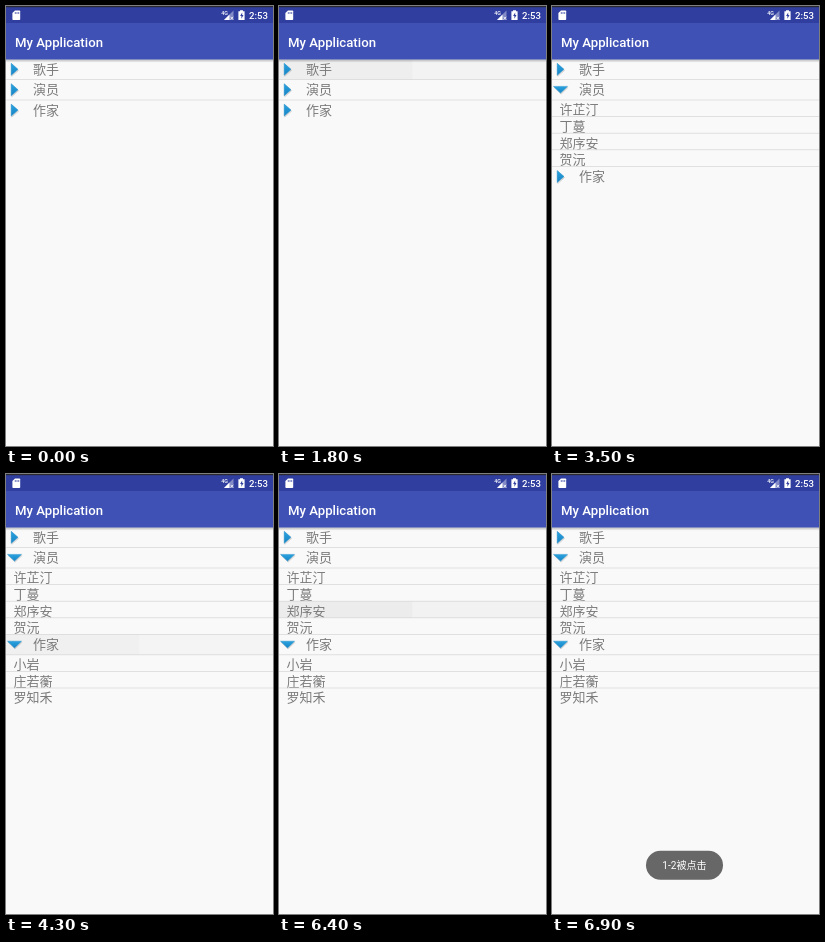
Recreate the animation shown at these times as an HTML page. Size 267x440 px, loop 8000 ms.

```html
<!DOCTYPE html>
<html lang="zh-CN">
<head>
<meta charset="utf-8">
<style>
html, body { margin: 0; width: 100%; height: 100%; overflow: hidden; background: #f9f9f9; }
svg { display: block; width: 100%; height: 100%; }
text { font-family: Roboto, "Noto Sans CJK SC", "Noto Sans CJK", sans-serif; white-space: pre; }
.row { font-size: 13px; fill: #7b7b7b; }
.bar { font-weight: 500; fill: #fff; }
</style>
</head>
<body>
<svg viewBox="0 0 267 440">
  <defs>
    <linearGradient id="shade" x2="0" y2="1">
      <stop stop-color="#000" stop-opacity=".26"/>
      <stop offset="1" stop-color="#000" stop-opacity="0"/>
    </linearGradient>
    <linearGradient id="blue" x2="0" y2="1">
      <stop stop-color="#2aa3e0"/>
      <stop offset="1" stop-color="#1683c4"/>
    </linearGradient>
  </defs>
  <rect width="267" height="440" fill="#f9f9f9"/>
  <g id="list"></g>

  <rect y="53.3" width="267" height="3.4" fill="url(#shade)"/>
  <rect y="17" width="267" height="36.5" fill="#3f51b5"/>
  <rect width="267" height="17" fill="#303f9f"/>
  <rect width="267" height="1.2" fill="#29292f"/>
  <text class="bar" x="9" y="41" font-size="13.2">My Application</text>

  <path d="M9 4.5H13.4Q14.2 4.5 14.2 5.3V13.2Q14.2 14 13.4 14H7.2Q6.4 14 6.4 13.2V7.1Z" fill="#fff"/>
  <path d="M9.3 6v2M11 6v2M12.7 6v2" stroke="#303f9f" stroke-width=".7"/>
  <path d="M227.5 4.5V14H218Z" fill="#fff" opacity=".4"/>
  <path d="M223.5 8.5V14H218Z" fill="#fff"/>
  <path d="M224.6 10.8l2.6 2.8m0-2.8l-2.6 2.8" stroke="#fff" stroke-width=".8"/>
  <text class="bar" x="215.3" y="9" font-size="5.4">4G</text>
  <path d="M234 4.3h3v1h1.6v8.7h-6.2V5.3H234Z" fill="#fff"/>
  <path d="M236.2 6.4l-2.1 3.6h1.3v2.8l2.1-3.7h-1.3Z" fill="#303f9f"/>
  <text class="bar" x="243" y="12.7" font-size="9.6">2:53</text>

  <g id="toast">
    <rect x="94" y="376.7" width="77" height="29" rx="14.5" fill="#676767"/>
    <text x="110.3" y="395.2" font-size="10.1" fill="#fff">1-2被点击</text>
  </g>
</svg>
<script>
const LOOP = 8000, TOP = 53.5, GROUP_H = 20.4, CHILD_H = 16.6;
const groups = [
  { name: '歌手', items: ['韩柏川', '吴启澜', '宋岚'], open: [500, 1800] },
  { name: '演员', items: ['许芷汀', '丁蔓', '郑序安', '贺沅'], open: [3000, LOOP] },
  { name: '作家', items: ['小岩', '庄若蘅', '罗知禾'], open: [4300, LOOP] }
];
// Pressed rows: group, child (-1 for the header), start, end, strength
const presses = [
  [0, -1, 500, 1900, 1],
  [0, -1, 1900, 2100, .5],
  [1, -1, 3000, 3300, .8],
  [2, -1, 4300, 4600, .8],
  [1, 2, 6400, 6800, 1.2]
];
const list = document.getElementById('list');
const toast = document.getElementById('toast');
const within = (t, a, b) => t >= a && t < b;

const label = (x, y, s) => `<text class="row" x="${x}" y="${y}">${s}</text>`;

function arrow(y, open) {
  const d = open ? 'M1.5 6.5H15.5L8.5 13.2Z' : 'M5.2 3.8L12 9.8L5.2 15.8Z';
  return `<g transform="translate(0 ${y})" stroke-linejoin="round">
    <path d="${d}" transform="translate(.6 1)" fill="#888" stroke="#888" opacity=".3"/>
    <path d="${d}" fill="url(#blue)" stroke="#2b93cc" stroke-width=".5"/></g>`;
}

function highlight(t, g, c, y, h) {
  const p = presses.find(p => p[0] === g && p[1] === c && within(t, p[2], p[3]));
  if (!p) return '';
  const half = (x, a) =>
    `<rect x="${x}" y="${y}" width="133.5" height="${h}" opacity="${a * p[4]}"/>`;
  return half(0, .042) + half(133.5, .024);
}

function buildList(t) {
  let y = TOP, out = '';
  const addRow = (g, c, h, content) => {
    if (y > TOP) out += `<rect y="${y - .7}" width="267" height=".8" fill="#dadada"/>`;
    out += highlight(t, g, c, y, h) + content;
    y += h;
  };
  groups.forEach((group, g) => {
    const open = within(t, ...group.open);
    addRow(g, -1, GROUP_H, arrow(y, open) + label(27, y + 14.2, group.name));
    if (open) group.items.forEach((s, c) => addRow(g, c, CHILD_H, label(7.5, y + 14, s)));
  });
  return out;
}

let last = -1;
function render(now) {
  const t = Math.floor(now % LOOP / 100) * 100;
  if (t !== last) {
    last = t;
    list.innerHTML = buildList(t);
    toast.setAttribute('opacity', Math.min(1, Math.max(0, (t - 6400) / 490)));
  }
}
function tick() {
  render(performance.now());
  requestAnimationFrame(tick);
}
tick();
</script>
</body>
</html>
```
